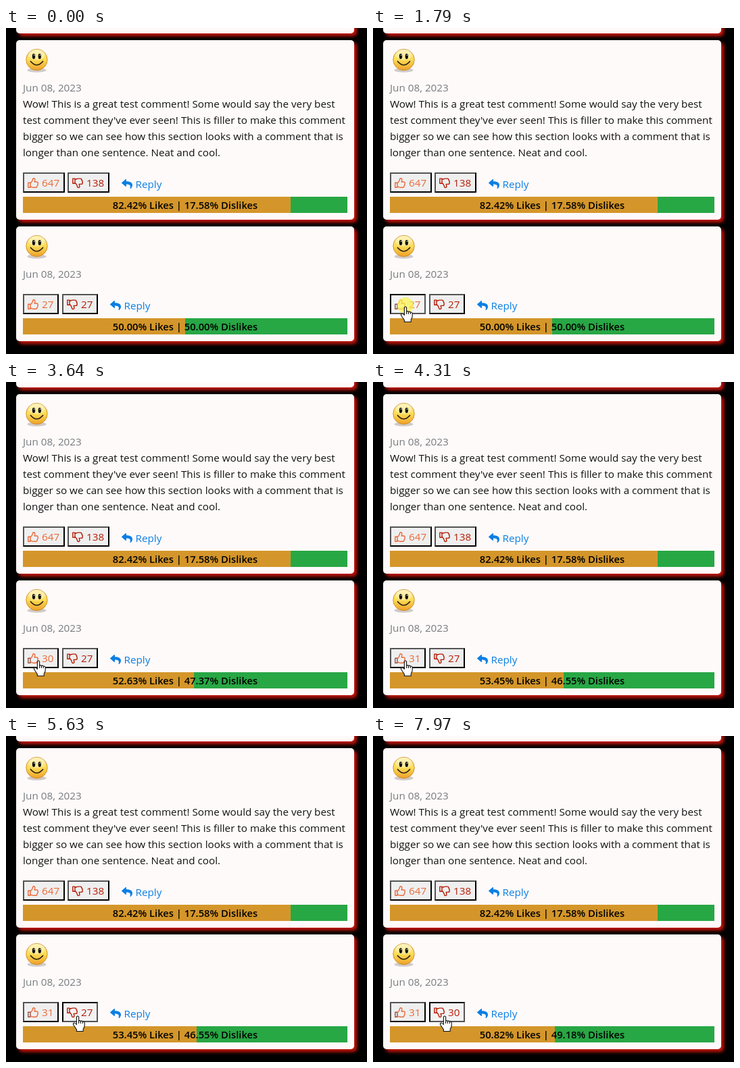
An HTML page for the animation above (7990 ms loop, 534x483 px).

```html
<!DOCTYPE html>
<html lang="en">
<head>
<meta charset="utf-8">
<title>Comment votes</title>
<style>
  html, body { margin: 0; width: 100%; height: 100%; overflow: hidden; background: #000; }
  #stage { position: absolute; left: 0; top: 0; width: 534px; height: 483px; overflow: hidden;
    font: 15.25px/24px "Open Sans", "Noto Sans", sans-serif; color: #111; white-space: pre; }
  #stage > *, .row > *, .vote > * { position: absolute; box-sizing: border-box; }
  .card { left: 15px; width: 500px; background: snow; border-radius: 5px; box-shadow: 4px 4px 5px #c8160c; }
  .face { left: 25px; }
  .date { left: 25px; color: #777b7e; }
  .row { left: 0; width: 534px; height: 60px; }
  .vote { top: 0; height: 30px; border: 2px outset #000; background: #efefef; }
  .vote.down { border-style: inset; background: #f3f3f3; }
  .vote svg { left: 5px; top: 6px; }
  .vote span { left: 26px; top: 1px; }
  .like { color: #ea6a3a; }
  .dislike { color: #b51c06; }
  .reply { top: 5px; color: #0a7fe4; }
  .arrow { top: 9px; color: #0a7fe4; }
  .bar { left: 25px; top: 36px; width: 480px; height: 24px; background: #28a745; }
  .fill { height: 100%; background: #d4962a; }
  .label { left: 25px; top: 36px; width: 480px; text-align: center; color: #000;
    font-size: 14.75px; font-weight: 600; }
  #glow { width: 24px; height: 24px; border-radius: 50%; background: rgba(250, 245, 70, .68); }
  #pointer { left: 0; top: 0; overflow: visible; }
</style>
</head>
<body>
<div id="stage"></div>
<script>
const LOOP = 7990;
const stage = document.getElementById('stage');

const face = top => `
  <svg class="face" style="top:${top}px" width="40" height="40">
    <ellipse cx="20.5" cy="34.5" rx="14" ry="3.2" fill="#8a8580" opacity=".4"/>
    <circle cx="20.5" cy="19" r="15.7" fill="url(#skin)" stroke="#c98a1c" stroke-width=".9"/>
    <ellipse cx="20.5" cy="11.5" rx="12" ry="8" fill="#fff" opacity=".32"/>
    <ellipse cx="16" cy="14" rx="2.2" ry="4" fill="#111"/>
    <ellipse cx="24.8" cy="14" rx="2.2" ry="4" fill="#111"/>
    <circle cx="16.6" cy="12.3" r=".8" fill="#fff"/>
    <circle cx="25.4" cy="12.3" r=".8" fill="#fff"/>
    <path d="M11.5 21.5Q20.5 32 29.5 21.5" fill="none" stroke="#2a2010" stroke-width="1.7" stroke-linecap="round"/>
  </svg>`;

const thumb = flip => `
  <svg width="16" height="16" fill="none" stroke="currentColor" stroke-width="1.4" stroke-linejoin="round">
    <g ${flip ? 'transform="matrix(1 0 0 -1 0 15.4)"' : ''}>
      <path class="cuff" d="M.8 7.2H4V14.3H.8Z"/>
      <path d="M4 8C6 6.5 7 5 7.3 3.2C7.5 1.6 8 .8 9 .8C10.6 .8 11 2 10.8 3.4L10.2 6H13.4
        C14.8 6 15.4 7 15 8C15.4 8.6 15.3 9.6 14.7 10C15 10.9 14.7 11.6 14 12
        C14 13.4 13.4 14.3 12 14.3H9C7 14.3 6 13.4 4 13"/>
    </g>
  </svg>`;

const vote = (kind, x, w) => `
  <div class="vote ${kind}" style="left:${x}px;width:${w}px">${thumb(kind === 'dislike')}<span></span></div>`;

const row = (id, top, w, x2, replyX) => `
  <div class="row" id="${id}" style="top:${top}px">
    ${vote('like', 25, w)}${vote('dislike', x2, w)}
    <svg class="arrow" style="left:${replyX}px" width="16" height="16">
      <path fill="currentColor" d="M.3 5.9 5.8 1.2C6.2.8 7 1.1 7 1.8v2.4c5 .1 9 1.1 9 5.9 0 1.9-1.2 3.8-2.6 4.8
        -.4.3-1-.1-.9-.6 1.4-4.5-.7-5.7-5.5-5.8v2.7c0 .6-.8 1-1.2.6L.3 7.1a.8.8 0 0 1 0-1.2z"/>
    </svg>
    <span class="reply" style="left:${replyX + 16.5}px"> Reply</span>
    <div class="bar"><div class="fill"></div></div>
    <div class="label"></div>
  </div>`;

const card = (top, h) => `<div class="card" style="top:${top}px;height:${h}px"></div>`;
const date = top => `<div class="date" style="top:${top}px">Jun 08, 2023</div>`;

const comment = [
  'Wow! This is a great test comment! Some would say the very best',
  "test comment they've ever seen! This is filler to make this comment",
  'bigger so we can see how this section looks with a comment that is',
  'longer than one sentence. Neat and cool.'
].join('\n');

stage.innerHTML = `
  <svg width="0" height="0"><defs>
    <linearGradient id="skin" x1="0" y1="0" x2="0" y2="1">
      <stop offset="0" stop-color="#fdf0a0"/><stop offset=".5" stop-color="#fbdc55"/>
      <stop offset="1" stop-color="#ee9f2a"/>
    </linearGradient></defs></svg>
  ${card(-60, 68)}${card(18, 266)}${card(294, 170)}
  ${face(28)}${date(76)}
  <div style="left:25px;top:100px">${comment}</div>
  ${row('first', 214, 62, 91, 171)}
  ${face(304)}${date(352)}
  ${row('second', 394, 53, 83, 154)}
  <div id="glow"></div>
  <svg id="pointer" width="1" height="1" fill="#fff" stroke="#111" stroke-width="1.1" stroke-linejoin="round">
    <g id="hand">
      <path d="M-1.6 1Q0-1 1.6 1V7Q3.2 6 4.4 7.5Q6 6.6 7.3 8.2Q9.2 7.6 10.2 9.6V14Q10.2 16.5 8.2 19V22.5H-1.6
        V19.8Q-3 18-5.8 13.8Q-7.3 11.2-5.9 10.2Q-4.2 9.4-1.6 12.5Z"/>
      <path fill="none" d="M1.6 7V11M4.4 7.5V11M7.3 8.2V11"/>
    </g>
    <path id="plain" d="M0 0V16L3.7 12.6 6.2 18.4 8.6 17.4 6.1 11.7H11Z"/>
  </svg>`;

const $ = sel => stage.querySelector(sel);

function show(id, likes, dislikes) {
  const p = likes / (likes + dislikes) * 100;
  $(`#${id} .like span`).textContent = likes;
  $(`#${id} .dislike span`).textContent = dislikes;
  $(`#${id} .fill`).style.width = p + '%';
  $(`#${id} .label`).textContent = `${p.toFixed(2)}% Likes | ${(100 - p).toFixed(2)}% Dislikes`;
}

// press time, release time, button
const clicks = [
  [1770, 1920, 'like'], [2820, 2940, 'like'], [3500, 3640, 'like'], [4170, 4310, 'like'],
  [5530, 5670, 'dislike'], [6300, 6460, 'dislike'], [7200, 7360, 'dislike'], [7910, 8030, 'dislike']
];

// time, x, y of the pointer tip
const path = [
  [0, 33, 490], [990, 33, 484], [1130, 32, 446], [1270, 30, 396], [1370, 30, 396],
  [1500, 40, 403], [1630, 48, 413], [4920, 48, 413], [4980, 95, 412], [5040, 143, 409],
  [5090, 158, 404], [5160, 136, 409], [5260, 106, 415], [LOOP, 106, 415]
];

function tipAt(t) {
  const i = path.findIndex(k => k[0] > t);
  const [a, b] = [path[i - 1], path[i]];
  const f = (t - a[0]) / (b[0] - a[0]);
  return [a[1] + (b[1] - a[1]) * f, a[2] + (b[2] - a[2]) * f];
}

const glow = $('#glow'), pointer = $('#pointer'), hand = $('#hand'), plain = $('#plain');
const buttons = { like: $('#second .like'), dislike: $('#second .dislike') };
const cuff = $('#second .like .cuff'), reply = $('#second .reply');

function draw(t) {
  const [x, y] = tipAt(t);
  const count = { like: 27, dislike: 27 };
  const done = clicks.filter(c => t >= c[1]);
  done.forEach(c => count[c[2]]++);
  show('second', count.like, count.dislike);

  const press = clicks.find(c => t >= c[0] && t < c[1]);
  for (const kind in buttons) buttons[kind].classList.toggle('down', !!press && press[2] === kind);
  const lit = press && t < (press[0] + press[1]) / 2;
  glow.style.display = lit ? 'block' : 'none';
  glow.style.left = x - 12 + 'px';
  glow.style.top = y - 14 + 'px';

  cuff.style.stroke = t > 1630 ? '#93554a' : '';
  reply.style.textDecoration = x > 141 ? 'underline' : 'none';

  const onButton = y < 424;
  hand.style.display = onButton ? '' : 'none';
  plain.style.display = onButton ? 'none' : '';
  pointer.style.transform = `translate(${Math.round(x)}px, ${Math.round(y)}px)`;
}

show('first', 647, 138);
draw(0);
const start = performance.now();
(function tick() {
  draw((performance.now() - start) % LOOP);
  requestAnimationFrame(tick);
})();
</script>
</body>
</html>
```
